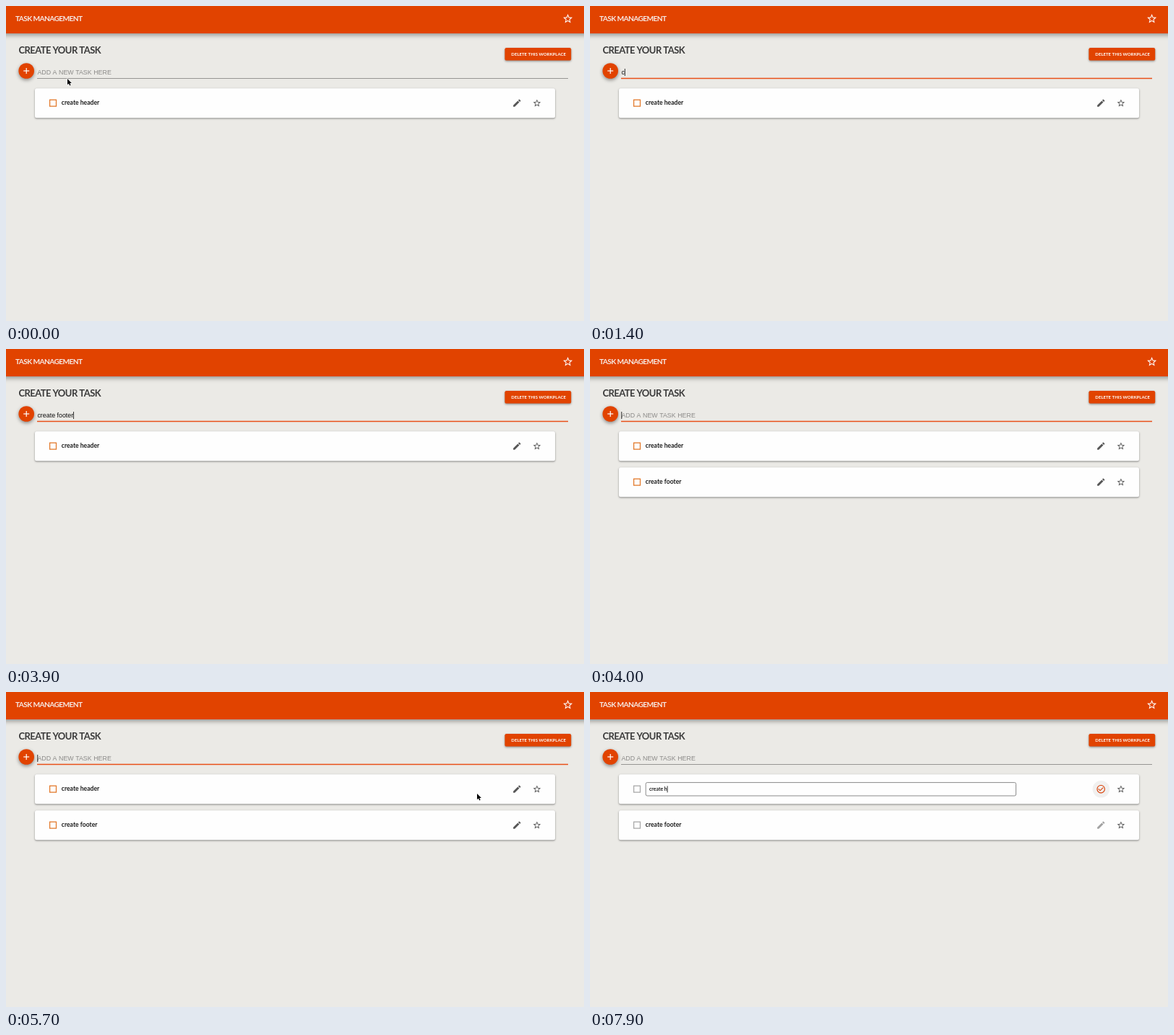
These frames come from a looping animation (800x437 px, 8000 ms). An HTML page with a canvas:

```html
<!DOCTYPE html>
<html lang="en">
<head>
<meta charset="utf-8">
<title>Task management</title>
<style>
  html, body { margin: 0; width: 100%; height: 100%; overflow: hidden; background: #ebeae6; }
  canvas { display: block; width: 800px; height: 437px; }
</style>
</head>
<body>
<canvas id="stage"></canvas>
<script>
const W = 800, H = 437, LOOP = 8000, STEP = 100;
const ORANGE = '#e14300', BG = '#ebeae6', INK = '#1c1c1c';
const LATO = 'Lato, sans-serif', ARIAL = '"Liberation Sans", Arial, sans-serif';

const canvas = document.getElementById('stage');
const ctx = canvas.getContext('2d');
const ratio = window.devicePixelRatio || 1;
canvas.width = W * ratio;
canvas.height = H * ratio;

// Icons on a 24 unit grid
const ICON = {
  star: new Path2D('M22 9.24l-7.19-.62L12 2 9.19 8.63 2 9.24l5.46 4.73L5.82 21 12 17.27 18.18 21l-1.63-7.03L22 9.24zM12 15.4l-3.76 2.27 1-4.28-3.32-2.88 4.38-.38L12 6.1l1.71 4.04 4.38.38-3.32 2.88 1 4.28L12 15.4z'),
  pencil: new Path2D('M3 17.25V21h3.75L17.81 9.94l-3.75-3.75L3 17.25zM20.71 7.04a1 1 0 0 0 0-1.41l-2.34-2.34a1 1 0 0 0-1.41 0l-1.83 1.83 3.75 3.75 1.83-1.83z'),
  check: new Path2D('M16.59 7.58L10 14.17l-3.59-3.58L5 12l5 5 8-8zM12 2C6.48 2 2 6.48 2 12s4.48 10 10 10 10-4.48 10-10S17.52 2 12 2zm0 18c-4.42 0-8-3.58-8-8s3.58-8 8-8 8 3.58 8 8-3.58 8-8 8z')
};
const ARROW = new Path2D('M0 0V8.2L1.9 6.5 3.2 9.4 4.6 8.8 3.3 6H5.9Z');
const HAND = new Path2D('M1.2 1C1.2-.2 2.8-.2 2.8 1V4L6 4.6Q7.4 5 7.2 6.6L6.5 10H2.4L-.3 6.6C-.7 5.8.2 5.2 1.2 6.1Z');

// Typing: [time, text]
const NEW_TASK = [[1400, 'c'], [1500, 'cr'], [1700, 'cre'], [1900, 'crea'], [2300, 'creat'],
  [2500, 'create'], [2700, 'create '], [2900, 'create f'], [3200, 'create fo'], [3300, 'create foo'],
  [3500, 'create foot'], [3600, 'create foote'], [3700, 'create footer']];
const ERASE = [7200, 7400, 7500, 7700, 7900];
const FOCUS = 500, ADD = 4000, BLUR = 6440, EDIT = 6600;

// Pointer path: [time, x, y]
const POINTER = [[0, 85, 101], [300, 85, 92], [4400, 85, 92], [5300, 486, 105],
  [5700, 652, 141], [5900, 652, 141], [6400, 704, 133], [8000, 704, 133]];

const clamp = v => Math.max(0, Math.min(1, v));
const easeOut = v => 1 - Math.pow(1 - clamp(v), 3);
const blinkOn = since => since >= 0 && since % 1000 < 500;

function text(str, x, y, font, color, spacing = 0) {
  ctx.font = font;
  ctx.fillStyle = color;
  ctx.letterSpacing = spacing + 'px';
  ctx.fillText(str, x, y);
  return x + ctx.measureText(str).width;
}

function rect(x, y, w, h, color) {
  ctx.fillStyle = color;
  ctx.fillRect(x, y, w, h);
}

function shadowed(blur, dy, alpha, draw) {
  ctx.save();
  ctx.shadowColor = `rgba(0,0,0,${alpha})`;
  ctx.shadowBlur = blur * ratio;
  ctx.shadowOffsetY = dy * ratio;
  draw();
  ctx.restore();
}

function panel(x, y, w, h, r, fill) {
  ctx.beginPath();
  ctx.roundRect(x, y, w, h, r);
  ctx.fillStyle = fill;
  ctx.fill();
}

function disc(x, y, r, fill) {
  ctx.beginPath();
  ctx.arc(x, y, r, 0, 7);
  ctx.fillStyle = fill;
  ctx.fill();
}

function icon(name, cx, cy, size, color) {
  const s = size / 24;
  ctx.save();
  ctx.translate(cx - size / 2, cy - size / 2);
  ctx.scale(s, s);
  ctx.fillStyle = color;
  ctx.fill(ICON[name], 'evenodd');
  ctx.restore();
}

function caret(x, y, h) {
  rect(x, y, 0.8, h, '#000');
}

function pointerAt(t) {
  const i = Math.max(1, POINTER.findIndex(p => p[0] > t));
  const [t0, x0, y0] = POINTER[i - 1], [t1, x1, y1] = POINTER[i];
  const k = clamp((t - t0) / (t1 - t0));
  return { x: x0 + (x1 - x0) * k, y: y0 + (y1 - y0) * k };
}

function header() {
  shadowed(7, 2, 0.42, () => rect(-10, -10, W + 20, 48, ORANGE));
  text('TASK MANAGEMENT', 13, 21.2, `bold 10.2px ${LATO}`, '#f6e9e3', -0.6);
  icon('star', 777.6, 17.6, 15.6, '#fff');
  text('CREATE YOUR TASK', 17.4, 66.3, `bold 13px ${LATO}`, '#3b3b3b', -0.55);
  shadowed(3, 1.2, 0.4, () => panel(690.4, 58, 91.8, 17.6, 2.2, ORANGE));
  text('DELETE THIS WORKPLACE', 699.3, 69, `bold 6.05px ${LATO}`, '#fff');
}

function inputRow(t, hover) {
  shadowed(5, 2, 0.42, () => disc(28.2, 90, 10.8, ORANGE));
  rect(24.2, 89.4, 8, 1.2, '#fff');
  rect(27.6, 86, 1.2, 8, '#fff');

  if (hover && t < FOCUS) rect(43, 99.8, 735, 1.2, '#2b2b2b');
  else rect(43, 100, 735, 1, '#969593');
  const open = t < BLUR ? easeOut((t - FOCUS) / 200) : 1 - easeOut((t - BLUR) / 700);
  const scale = t > BLUR + 200 ? 0 : open;
  if (scale > 0) rect(410.5 - 367.5 * scale, 99.7, 735 * scale, 1.5, '#e8501a');

  const typed = t < ADD ? NEW_TASK.filter(k => k[0] <= t) : [];
  const value = typed.length ? typed[typed.length - 1][1] : '';
  const font = `8.9px ${ARIAL}`;
  let end = 43.4;
  if (value) end = text(value, end, 95, font, '#111');
  else text('ADD A NEW TASK HERE', end, 95, font, '#8b8a88');

  const last = t >= ADD ? 3700 : typed.length ? typed[typed.length - 1][0] : 600;
  if (t < BLUR && blinkOn(t - last)) caret(end, 87, 10);
}

function card(y, label, editing, edited, hover, t) {
  const mid = y + 20.6;
  shadowed(2.5, 1, 0.45, () => panel(40, y, 720, 41, 2.5, '#fefefe'));
  ctx.lineWidth = 1.3;
  ctx.strokeStyle = editing ? '#a9a9a9' : '#e27a2c';
  ctx.strokeRect(60.6, mid - 4.6, 8.9, 8.9);

  if (hover) disc(707.4, mid, 11.8, '#f1f0ef');
  if (edited) {
    ctx.beginPath();
    ctx.roundRect(77.2, y + 11.4, 512.4, 18.4, 2);
    ctx.lineWidth = 1;
    ctx.strokeStyle = '#8a8a8a';
    ctx.stroke();
    const gone = ERASE.filter(k => k <= t);
    const end = text(label.slice(0, label.length - gone.length), 82, y + 23, `bold 6.9px ${LATO}`, INK);
    if (blinkOn(t - (gone.length ? gone[gone.length - 1] : EDIT))) caret(end, y + 16.2, 9);
    icon('check', 707.2, mid - 0.1, 13.8, '#d9430a');
  } else {
    text(label, 76.8, y + 23, `bold 8.6px ${LATO}`, INK);
    icon('pencil', 707.2, mid - 0.1, 13.6, editing ? '#a2a2a2' : '#565656');
  }
  icon('star', 734.9, mid - 0.1, 12.6, '#4c4c4c');
}

function pointer(t, p, overInput, overPencil) {
  if ((t >= 1400 && t < 4500) || t >= ERASE[0]) return;
  ctx.save();
  ctx.translate(p.x, p.y);
  ctx.lineJoin = 'round';
  if (overInput) {
    rect(-0.4, -4.5, 0.9, 9, '#222');
    rect(-1.8, -5, 3.6, 0.8, '#222');
    rect(-1.8, 4.2, 3.6, 0.8, '#222');
  } else {
    const shape = overPencil ? HAND : ARROW;
    ctx.lineWidth = overPencil ? 0.9 : 1.2;
    ctx.strokeStyle = overPencil ? '#111' : '#fff';
    ctx.fillStyle = overPencil ? '#fff' : '#000';
    ctx.stroke(shape);
    ctx.fill(shape);
  }
  ctx.restore();
}

function draw(t) {
  ctx.setTransform(ratio, 0, 0, ratio, 0, 0);
  rect(0, 0, W, H, BG);
  const p = pointerAt(t);
  const overInput = p.y > 83 && p.y < 100;
  const overPencil = Math.hypot(p.x - 707, p.y - 135) < 12;
  const editing = t >= EDIT;
  header();
  inputRow(t, overInput);
  card(114.2, 'create header', editing, editing, overPencil, t);
  if (t >= ADD) card(164.2, 'create footer', editing, false, false, t);
  pointer(t, p, overInput, overPencil);
}

const start = performance.now();
function tick() {
  const t = (performance.now() - start) % LOOP;
  draw(Math.floor(t / STEP) * STEP);
  requestAnimationFrame(tick);
}
tick();
</script>
</body>
</html>
```
